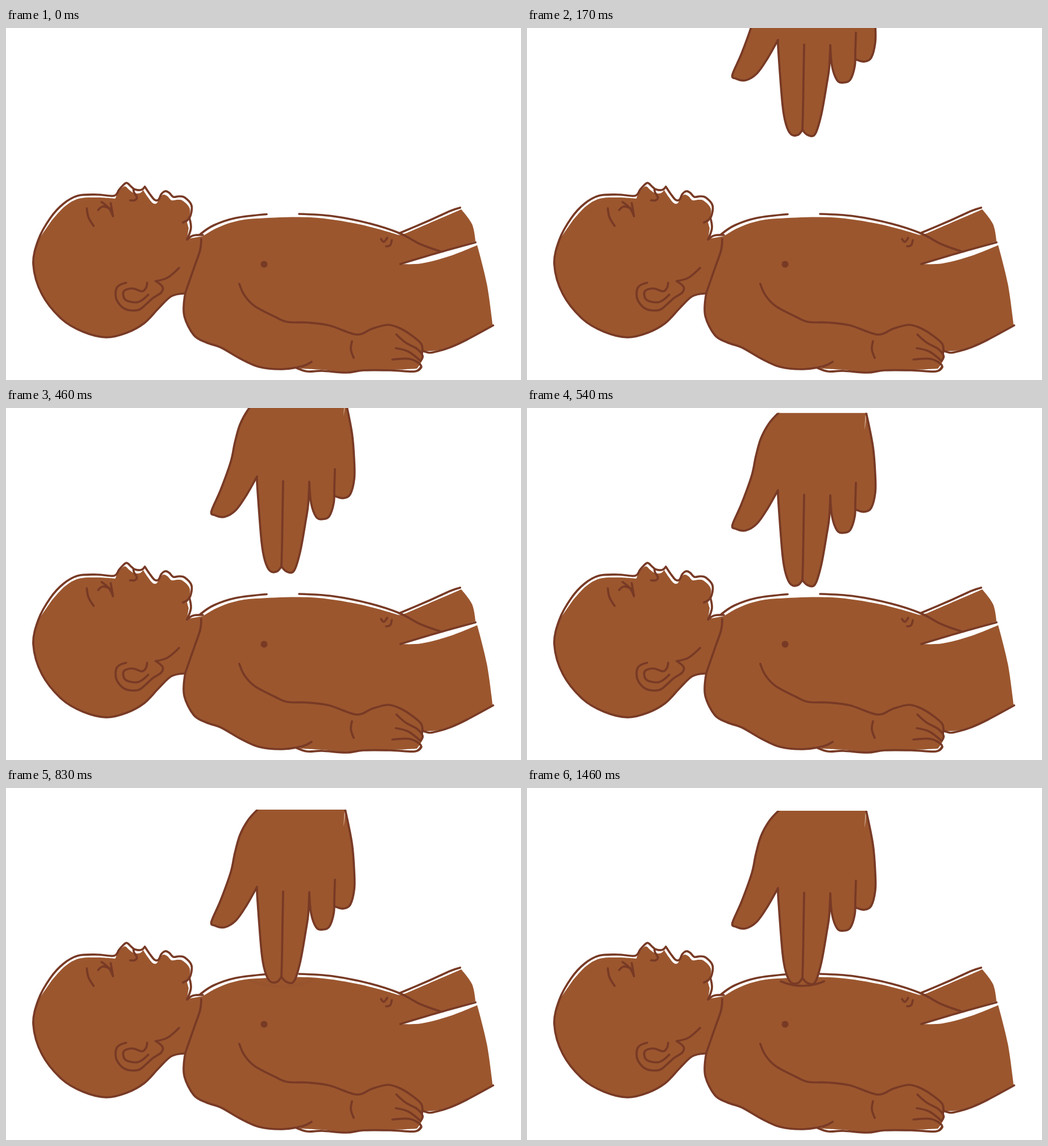
Recreate the animation shown at these times as an HTML page. Size 905x619 px, loop 1930 ms.

```html
<!DOCTYPE html>
<html lang="en">
<head>
<meta charset="utf-8">
<title>Infant chest compression</title>
<style>
  html, body { margin: 0; width: 100%; height: 100%; overflow: hidden; background: #fff; }
  svg { display: block; width: 100vw; height: 100vh; }
  .skin { fill: #9b562e; }
  .line { fill: none; stroke: #783a25; stroke-width: 3.7; stroke-linecap: round; stroke-linejoin: round; }
  .dot { fill: #783a25; }
  .glint { fill: #d3ad95; }
</style>
</head>
<body>
<svg viewBox="0 0 905 619">
  <clipPath id="wrist"><rect x="340" y="40" width="300" height="320"/></clipPath>
  <g id="baby"></g>
  <circle class="dot" cx="453.5" cy="415.5" r="6"/>
  <path id="dent" class="line" d="M446 340 Q484 356 522 340"/>
  <g id="hand"><g id="palm" clip-path="url(#wrist)"></g></g>
</svg>
<script>
  const LOOP = 1930, FPS = 24;
  const byId = id => document.getElementById(id);
  const hand = byId('hand'), dent = byId('dent');

  // Smooth curve through "x,y" points; a trailing * marks a sharp corner.
  function curve(text, dx = 0, dy = 0) {
    const pts = text.split(' ').map(s => {
      const [x, y] = s.split(',').map(parseFloat);
      return { x: x + dx, y: y + dy, sharp: s.endsWith('*') };
    });
    const slope = i => {
      const a = pts[i - 1], b = pts[i + 1];
      if (!a || !b || pts[i].sharp) return { x: 0, y: 0 };
      return { x: (b.x - a.x) / 6, y: (b.y - a.y) / 6 };
    };
    let d = `${pts[0].x},${pts[0].y}`;
    for (let i = 1; i < pts.length; i++) {
      const p = pts[i - 1], q = pts[i], s = slope(i - 1), t = slope(i);
      d += `C${p.x + s.x},${p.y + s.y} ${q.x - t.x},${q.y - t.y} ${q.x},${q.y}`;
    }
    return d;
  }

  const reversed = text => text.split(' ').reverse().join(' ');

  function add(parent, type, d) {
    const path = document.createElementNS('http://www.w3.org/2000/svg', 'path');
    path.setAttribute('class', type);
    path.setAttribute('d', d);
    byId(parent).append(path);
  }
  const fill = (parent, ...parts) => add(parent, 'skin', 'M' + parts.join('L') + 'Z');
  const line = (parent, ...texts) => texts.forEach(t => add(parent, 'line', 'M' + curve(t)));

  // Baby
  const skull = '312,467 290,472 268,493 243,519 212,536 176,544 135,534 98,512 63,468 48,416 57,372';
  const brow = '78,334 101,309 126,295 160,293 190,295';
  const face = '199,284 211,272.5 220,279 227,284 238,284.5 244,279* 252,291 261,302 268,302 ' +
    '273,292 280,287 287,290 294,297 304,296 314,298 326,312 323,333 311,342';
  const arm = '315,466 313,505 330,540 352,553 378,562 411,581 445,596 485,600 520,595 537,587';
  const belly = '346,366 370,352 400,341 440,335 535,333 620,345 690,364';
  const thighs = '703,361 800,319* 819,345 825,375* 693,415* 730,414 780,401 828,382* 845,450 855,522*';
  const under = '810,549 762,566 732,568* 731,585 722,599* 680,601 630,601 598,605 556,601 515,599';

  fill('baby', curve(skull), curve(brow, 2, 5), curve(face, -3, 6), '316,335', '321,352', '318,371',
    curve(belly), curve(thighs), curve(under), curve(reversed(arm)));

  line('baby', `${skull} ${brow} ${face}`, arm);
  line('baby', '322,333 325,352 318,372* 329,365 346,364', '343,371 341,391 331,420 315,466');
  // eye and nostril
  line('baby', '142,317 145,333 154,348', '162,320 170,314 182,317',
    '168,306 181,317 188,331* 186,319 184,308', '224,284 225,289 230,298 226,303 218,303');
  // ear
  line('baby',
    '211,448 195,456 194,477 209,494 232,496 247,485 258,475 273,465 275,455 263,445* 284,439 304,422',
    '248,448 246,457 239,463 222,458 207,463 210,478 232,482 250,469');
  // chest, navel and legs
  line('baby', '341,363 365,347 404,334 458,327.5', '515,327 575,331 640,344 692,361 728,380 764,393');
  line('baby', '659,371 664,376 670,369', '668,384 675,382 678,373');
  line('baby', '691,361 745,338 780,322 798,316', '693,415 760,395 825,377',
    '856,523 810,548 782,561 760,568 745,571 733,568');
  // forearm and fingers
  line('baby', '410,450 419,470 437,489 473,508 495,517 530,518 568,523 616,539 643,529 ' +
    '670,522 690,527 712,540 730,556 731,573');
  line('baby', '686,539 702,553 722,564 732,576 729,585', '685,563 707,569 728,585',
    '679,583 710,582 729,593 724,602', '608,551 606,565 611,580',
    '511,598 530,604 556,603 598,606 628,602 676,602 718,604 730,596');

  // Pressing hand
  const thumb = '442,40 425,59 411,85 402,117 395,150 377,200 361,237 367,244 384,247 404,235 423,208 ' +
    '441,176* 442,200 449,290 455,324 464,342 476,343 484,334';
  const fingers = '484,334 493,343 506,342 517,308 527,252 531,225 533,185* ' +
    '536,222 545,247 556,251 568,246 576,222 577,195 578,163';
  const little = '577,210 593,214 605,207 612,180 612,150 608,100 596,40';
  fill('palm', curve(thumb), curve(fingers), curve(little));
  add('palm', 'glint', 'M596 43Q596 58 593 70Q594 56 594.5 44Z');
  line('palm', thumb, fingers, little, '487,184 486,240 485,300 484,334');

  // Height of the hand above its pressed position: [step, pixels]
  const keys = [[0, 360], [1, 282], [2, 227], [4, 155], [8, 88], [11, 55.5],
                [13, 31.5], [16, 15], [19, 4], [21, 0]];

  function lift(step) {
    const i = keys.findIndex(k => k[0] >= step);
    if (i < 0) return 0;
    if (i === 0) return keys[0][1];
    const [a, from] = keys[i - 1], [b, to] = keys[i];
    return from + (to - from) * (step - a) / (b - a);
  }

  function draw(ms) {
    const step = Math.floor((ms + 4) * FPS / 1000);
    hand.setAttribute('transform', `translate(0 ${-lift(step)})`);

    // The dent fades in and tightens under the fingertips.
    const p = Math.max(0, Math.min(1, (step - 19) / 16));
    dent.setAttribute('opacity', p);
    dent.setAttribute('transform', `translate(484 345) scale(${1.5 - p / 2}) translate(-484 -345)`);
  }

  const start = performance.now();
  function tick() {
    draw((performance.now() - start) % LOOP);
    requestAnimationFrame(tick);
  }
  draw(0);
  requestAnimationFrame(tick);
</script>
</body>
</html>
```
